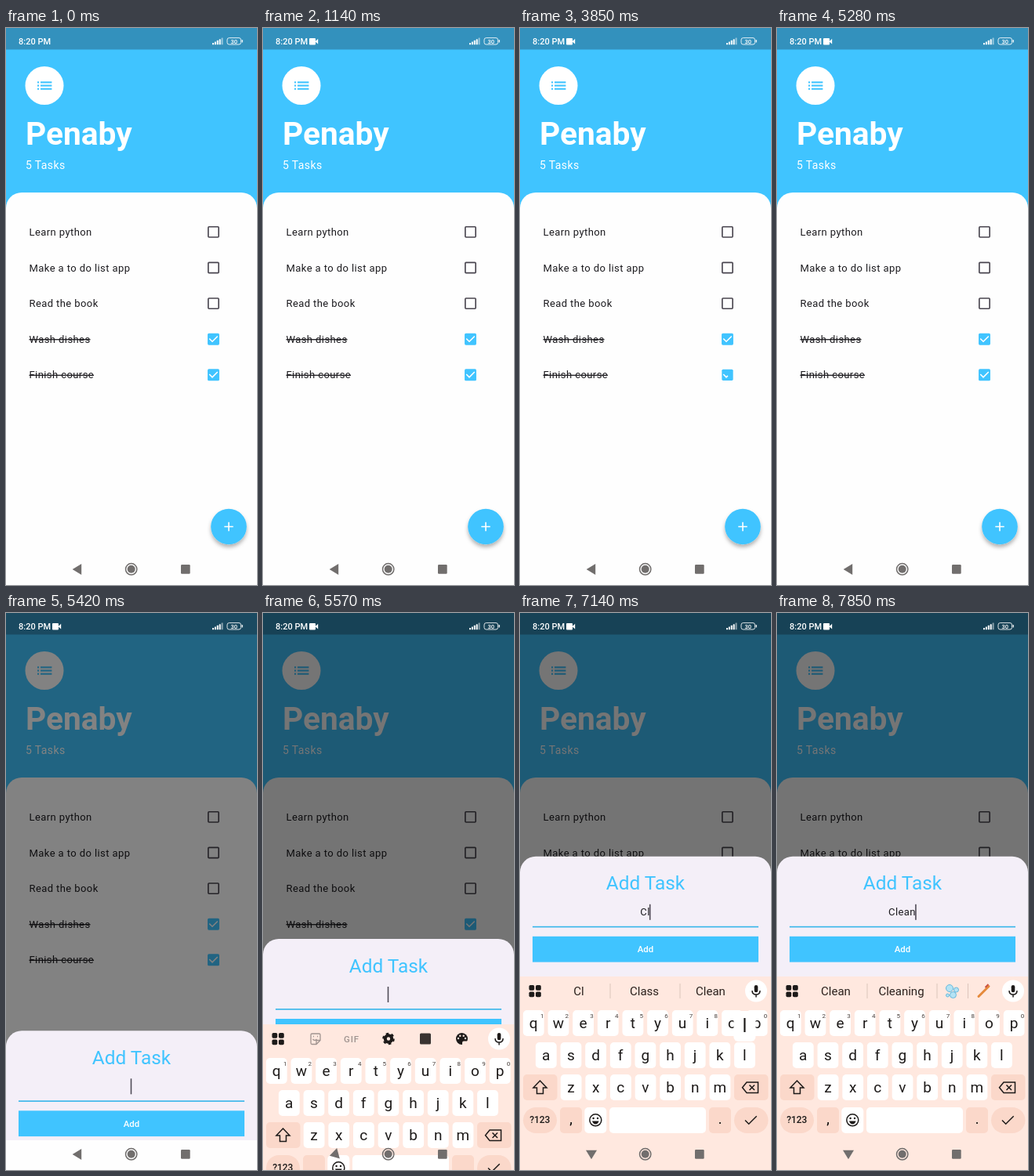
An HTML page that plays this animation: 320 by 711 pixels, repeating every 8000 ms.

```html
<!DOCTYPE html>
<html lang="en">
<head>
<meta charset="utf-8">
<title>Task list</title>
<style>
html, body { margin: 0; width: 100%; height: 100%; overflow: hidden; background: #fefefe; }
svg { display: block; width: 100vw; height: 100vh; }
text { font-family: Roboto, Inter, sans-serif; white-space: pre; }
.mid { text-anchor: middle; }
.item { font-size: 13.02px; letter-spacing: .407px; fill: #1c1b1f; }
.done { text-decoration: line-through; }
.word { font-size: 15px; fill: #2b211d; }
.line { fill: none; stroke: #1d1a19; stroke-width: 1.5; }
</style>
</head>
<body>
<svg id="stage" viewBox="0 0 320 711"></svg>
<script>
const BLUE = '#40c4ff', INK = '#1d1a19', PEACH = '#ffe8df', ACCENT = '#fbd8ca';
const LOOP = 8000, OPEN = 5420, TYPING = 6570;

const rect = (x, y, w, h, fill, r = 0, extra = '') =>
  `<rect x="${x}" y="${y}" width="${w}" height="${h}" rx="${r}" fill="${fill}" ${extra}/>`;
const circle = (x, y, r, fill, extra = '') =>
  `<circle cx="${x}" cy="${y}" r="${r}" fill="${fill}" ${extra}/>`;
const path = (d, extra = 'class="line"') => `<path d="${d}" ${extra}/>`;
const text = (x, y, s, extra = '') => `<text x="${x}" y="${y}" ${extra}>${s}</text>`;
const group = (id, body, extra = '') => `<g id="${id}" ${extra}>${body}</g>`;
const $ = id => document.getElementById(id);

// Tasks
const tasks = ['Learn python', 'Make a to do list app', 'Read the book', 'Wash dishes', 'Finish course'];
const rowY = i => 260.4 + i * 45.6;

// k runs from 0 (empty box) through 0.5 (solid box) to 1 (ticked)
function checkbox(y, k) {
  const size = 14.9 - 1.6 * (1 - Math.abs(k - .5) * 2);
  const a = 264.5 - size / 2, b = y - size / 2;
  if (k < .5) {
    const w = Math.min(size / 2, 1.63 + size * k);
    return rect(a + w / 2, b + w / 2, size - w, size - w, 'none', 1,
      `stroke="${k < .1 ? '#49454f' : BLUE}" stroke-width="${w}"`);
  }
  const p = (k - .5) * 2;
  const at = (u, v) => `${257 + u * 15} ${y - 7.5 + v * 15}`;
  const m = Math.min(1, p * 2), n = Math.max(0, p * 2 - 1);
  let out = rect(a, b, size, size, BLUE, 1.6);
  if (p > 0) {
    let d = `M${at(.15, .45)}L${at(.15 + .25 * m, .45 + .25 * m)}`;
    if (n) d += `L${at(.4 + .45 * n, .7 - .45 * n)}`;
    out += path(d, 'fill="none" stroke="#fff" stroke-width="1.6"');
  }
  return out;
}

function appView() {
  let s = rect(0, 0, 320, 711, BLUE) + rect(0, 0, 320, 27.5, '#3391bd');
  s += circle(49, 73.5, 24.5, '#fff');
  for (const y of [69.3, 73.5, 77.7])
    s += rect(40, y - 1, 2.1, 2.1, BLUE) + rect(44, y - 1, 14.4, 2.1, BLUE);
  s += text(25, 149, 'Penaby', 'font-size="40.7" font-weight="700" fill="#fff"');
  s += text(25, 180, '5 Tasks', 'font-size="14" letter-spacing=".4" fill="#fff"');
  s += rect(0, 210, 320, 540, '#fefefe', 20);
  tasks.forEach((name, i) => {
    s += text(29.5, rowY(i) + 4.5, name, `id="task${i}" class="item${i > 2 ? ' done' : ''}"`);
    s += group('box' + i, checkbox(rowY(i), i > 2 ? 1 : 0));
  });
  s += circle(284, 636.5, 22.8, BLUE, 'filter="url(#lift)"');
  s += path('M278.3 636.5h11.4M284 630.8v11.4', 'stroke="#fff" stroke-width="1.6"');
  return s;
}

function statusBar() {
  let s = text(16, 21, '8:20 PM', 'font-size="11" font-weight="500" fill="#fff"');
  s += group('camera', rect(59, 13, 8, 8.4, '#fff', 1) + path('M66.5 17.2l3.7-3.4v6.8z', 'fill="#fff"'));
  for (let i = 0; i < 5; i++)
    s += rect(263 + i * 2.9, 19 - i * 1.6, 2, 2.2 + i * 1.6, '#fff', .5, i > 3 ? 'opacity=".5"' : '');
  s += rect(282, 12.6, 17.5, 8.4, 'none', 2.5, 'stroke="#fff" stroke-opacity=".85"');
  s += rect(300.6, 15, 1.3, 3.6, '#fff', .6);
  return s + text(290.8, 19.6, '30', 'class="mid" font-size="7.5" font-weight="500" fill="#fff"');
}

// Sheet, drawn with its top edge at 0
function sheetView() {
  return rect(0, 0, 320, 330, '#f4eff8', 20)
    + text(160, 42.5, 'Add Task', `class="mid" font-size="24.4" fill="${BLUE}"`)
    + text(159.5, 75, '', 'id="entry" class="item mid"')
    + rect(158.7, 61, 1.6, 20, '#514d58', 0, 'id="cursor"')
    + rect(16, 89, 288, 1.6, '#35b5ea')
    + rect(16, 102, 288, 32.8, BLUE)
    + text(160, 122.4, 'Add', 'class="mid" font-size="11.4" font-weight="500" fill="#fff"');
}

// Keyboard
const rows = [['qwertyuiop', 17.2, 507], ['asdfghjkl', 33.2, 548], ['zxcvbnm', 65, 589]];
const keys = {};
rows.forEach(([letters, x, y]) =>
  [...letters].forEach((c, i) => keys[c] = { x: x + i * 31.65, y }));

function toolbar() {
  let s = path('M61 477.5q0-1.500 1.500-1.500h9q1.500 0 1.500 1.500v7l-5 5h-5.500q-1.500 0-1.500-1.500zM73 484.500h-5v5M63.500 483q2.500 3 5 0M64 479.500h1M69 479.500h1',
    'fill="none" stroke="#a09490" stroke-width="1.3"');
  s += text(113, 486.6, 'GIF', 'class="mid" font-size="11.5" font-weight="500" letter-spacing=".8" fill="#a09490"');
  s += circle(160, 482.5, 4.2, 'none', `stroke="${INK}" stroke-width="4"`);
  s += circle(160, 482.5, 6.7, 'none', `stroke="${INK}" stroke-width="2.2" stroke-dasharray="3.5 3.515"`);
  s += rect(200, 475.5, 14, 14, '#393331', 1.5);
  s += circle(253.5, 482.5, 7.5, INK);
  for (const [x, y] of [[249, 482], [251.3, 478.7], [255.7, 478.7], [258, 482]]) s += circle(x, y, 1.2, PEACH);
  return s + path('M254 490.500v-3q0-2 2-2h5v5z', `fill="${PEACH}"`);
}

function suggestions() {
  let s = text(75, 488, '', 'id="word0" class="word mid"') + text(158.5, 488, '', 'id="word1" class="word mid"')
    + text(243, 488, '', 'id="word2" class="word mid"');
  for (const x of [114.5, 203.5]) s += rect(x, 473, 1, 19, '#dcc5bb');
  const bubbles = [[220, 479, 4.5], [228.5, 481, 3], [224.5, 487.5, 4], [217.5, 488, 2]]
    .map(([x, y, r]) => circle(x, y, r, '#b4e3f4', 'stroke="#68b9dc"')).join('');
  const brush = path('M257 489.500L270 476.500', 'stroke="#e58a3c" stroke-width="3" stroke-linecap="round"')
    + path('M265.500 478l4-4', 'stroke="#cb5141" stroke-width="2"');
  return s + group('emoji', rect(243, 473, 1, 19, '#dcc5bb') + bubbles + brush);
}

function keyboardView() {
  let s = rect(0, 464, 320, 260, PEACH);
  for (const x of [11.5, 20]) for (const y of [475, 483.5]) s += rect(x, y, 6.8, 6.8, INK, 1.8);
  s += group('tools', toolbar()) + group('suggest', suggestions());
  s += circle(301, 482.5, 14, '#fff') + rect(298.7, 475, 4.6, 9.2, INK, 2.3);
  s += path('M296 482q0 5 5 5t5-5M301 487v3.500');
  for (const c in keys) {
    const { x, y } = keys[c];
    s += rect(x - 13.3, y, 26.8, 33, '#fff', 5);
    s += text(x, y + 22.7, c, `id="key-${c}" class="mid" font-size="19" fill="${INK}"`);
  }
  for (let i = 0; i < 10; i++)
    s += text(28.2 + i * 31.65, 516.5, (i + 1) % 10, 'class="mid" font-size="8" fill="#4a403c"');
  s += rect(4, 589, 43.5, 33, ACCENT, 5, 'id="shift"') + rect(273, 589, 43.5, 33, ACCENT, 5);
  s += path('M25.500 597l8.500 9h-4.500v7.500h-8v-7.500h-4.500z');
  s += path('M289 599h14.500v13.500h-14.500l-5.500-6.750zM292.500 602.500l6.500 6.500M299 602.500l-6.500 6.500');
  s += rect(4, 631, 43, 33, ACCENT, 16.5) + text(25.3, 651.3, '?123', `class="mid" font-size="12" font-weight="500" fill="${INK}"`);
  s += rect(51, 631, 28, 33, ACCENT, 5) + text(65, 652, ',', 'class="mid" font-size="18"');
  s += rect(82.3, 631, 28, 33, '#fff', 5) + circle(96.3, 647.3, 7.5, 'none', 'class="line"');
  s += circle(93.6, 645, 1.2, INK) + circle(99, 645, 1.2, INK) + path('M92 648.500h8.600q-1.300 4-4.300 4t-4.300-4z', `fill="${INK}"`);
  s += rect(114, 631, 123, 33, '#fff', 5);
  s += rect(241, 631, 28, 33, ACCENT, 5) + text(255, 652, '.', 'class="mid" font-size="18"');
  s += rect(273, 631, 43.5, 33, ACCENT, 16.5) + path('M287 647.500l4.700 4.700 10-10');
  return s + group('popup', rect(-14, -40, 28, 39, '#fff', 6) + text(0, -13, '', `id="popKey" class="mid" font-size="24" fill="${INK}"`));
}

function navBar() {
  const c = '#716e6d';
  return group('back', path('M-6.300 0L5.200-7v14z', `fill="${c}"`))
    + circle(159.7, 690.8, 7.2, 'none', `stroke="${c}" stroke-width="1.5"`) + circle(159.7, 690.8, 5, c)
    + rect(223, 685, 11.7, 11.8, c, 1.2);
}

$('stage').innerHTML = `<defs><filter id="lift" x="-30%" y="-30%" width="160%" height="170%">
  <feDropShadow dx="0" dy="3.500" stdDeviation="2.500" flood-opacity=".3"/></filter></defs>`
  + appView() + rect(0, 0, 320, 711, '#000', 0, 'id="scrim"') + statusBar()
  + group('sheet', sheetView()) + rect(0, 673, 320, 38, '#fefefe')
  + group('keyboard', keyboardView()) + navBar();

// Step tables: each row starts at its first value
const ticks = [[0, 1], [2710, .5], [2850, .12], [3000, 0], [3710, .5], [3850, .82], [4000, 1]];
const panels = [ // time, scrim, sheet top, keyboard drop, back arrow angle
  [0, 0, 720, 260, 0], [OPEN, .49, 533.3, 260, 0], [5570, .54, 416, 61, -15],
  [5710, .54, 319, 5, -80], [5850, .54, 310.8, 0, -90]];
const entries = [[0, ''], [6850, 'C', 'C', 'Can', 'Call'], [7140, 'Cl', 'Cl', 'Class', 'Clean'],
  [7280, 'Cle', 'Clear', 'Clean', 'Clever'], [7420, 'Clea', 'Clean', 'Cleaning'], [7570, 'Clean', 'Clean', 'Cleaning']];
const presses = [[0, ''], [6850, 'c'], [7000, ''], [7140, 'l'], [7280, 'e'], [7420, 'a'], [7570, 'n'], [7710, '']];
const rowAt = (table, t) => table.findLast(r => r[0] <= t);

const show = (id, on) => $(id).setAttribute('visibility', on ? 'visible' : 'hidden');
const move = (id, x, y, turn = 0) => $(id).setAttribute('transform', `translate(${x} ${y}) rotate(${turn})`);
const write = (id, s) => { if ($(id).textContent !== s) $(id).textContent = s; };

let lastTick = 1, lastEntry = null;
function draw(t) {
  show('camera', t >= 140);

  const tick = rowAt(ticks, t)[1];
  if (tick !== lastTick) {
    $('box4').innerHTML = checkbox(rowY(4), tick);
    $('task4').classList.toggle('done', t < 2710 || t >= 3710);
    lastTick = tick;
  }

  const [, dim, top, drop, turn] = rowAt(panels, t);
  $('scrim').setAttribute('opacity', dim);
  move('sheet', 0, top);
  move('keyboard', 0, drop);
  move('back', 91, 691, turn);

  const [, typed, ...words] = rowAt(entries, t);
  if (typed !== lastEntry) {
    write('entry', typed);
    [0, 1, 2].forEach(i => write('word' + i, words[i] || ''));
    const w = typed ? $('entry').getComputedTextLength() : 0;
    $('cursor').setAttribute('x', 158.7 + w / 2);
    lastEntry = typed;
  }
  $('tools').style.display = typed ? 'none' : '';
  $('suggest').style.display = typed ? '' : 'none';
  $('emoji').style.display = typed.length > 3 ? '' : 'none';
  show('cursor', t >= TYPING || Math.floor((t - OPEN) / 500) % 2 === 0);

  const upper = t >= TYPING && t < 6850;
  for (const c in keys) write('key-' + c, upper ? c.toUpperCase() : c);
  $('shift').setAttribute('fill', upper ? '#f3bfaa' : ACCENT);

  const key = rowAt(presses, t)[1];
  show('popup', key);
  if (key) {
    move('popup', keys[key].x, keys[key].y);
    write('popKey', key === 'c' ? 'C' : key);
  }
}

const start = performance.now();
function frame() {
  draw((performance.now() - start) % LOOP);
  requestAnimationFrame(frame);
}
frame();
</script>
</body>
</html>
```
